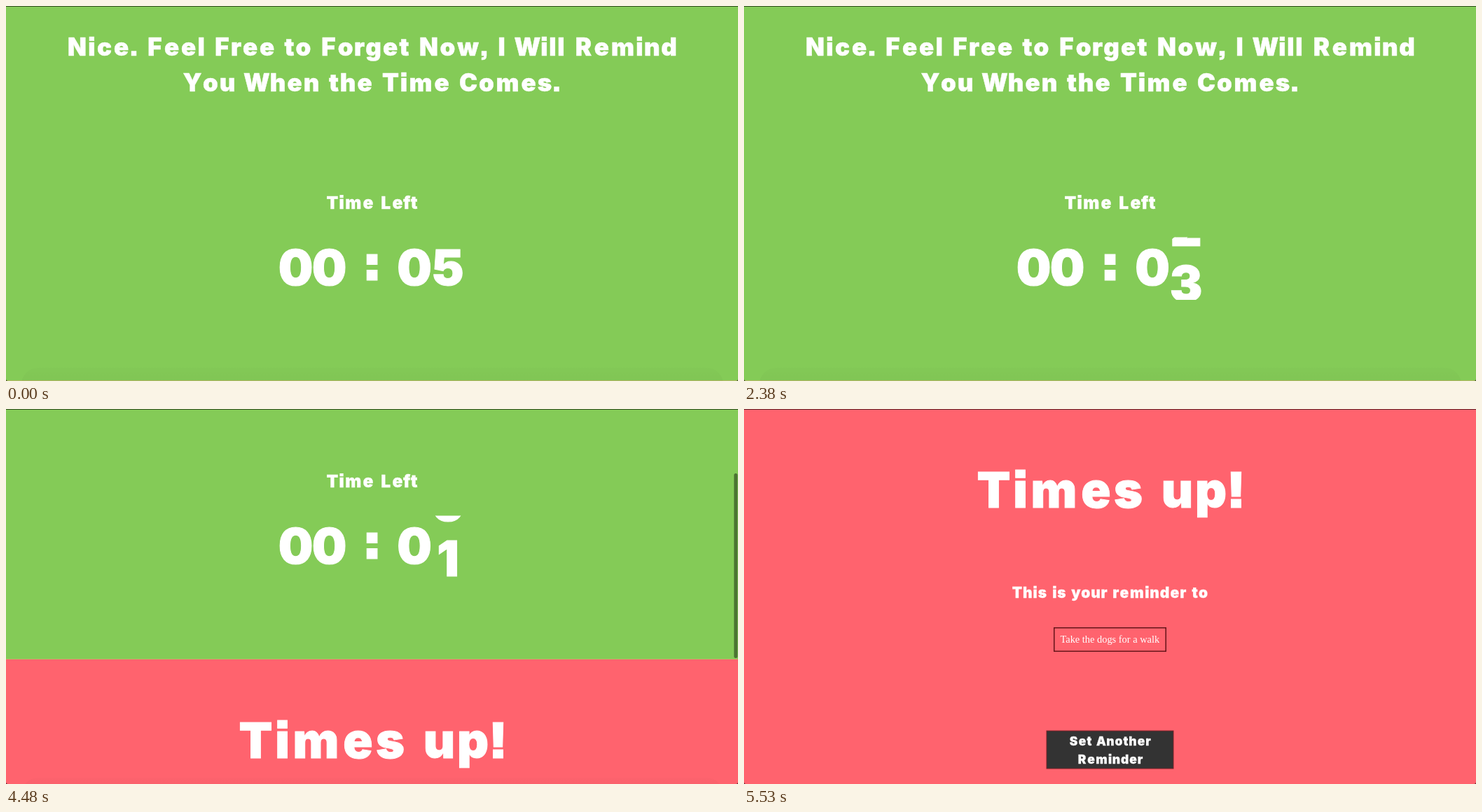
These frames come from a looping animation (1045x536 px, 5.6 s). An HTML page:

```html
<!DOCTYPE html>
<html lang="en">
<head>
<meta charset="utf-8">
<title>Reminder countdown</title>
<style>
  html, body { margin: 0; width: 100%; height: 100%; overflow: hidden; background: #84cb57; }
  svg { display: block; width: 100%; height: 100%; }
  .heavy {
    font-family: "Arial Black", Inter, "Liberation Sans", sans-serif;
    font-weight: 900;
    font-kerning: none;
    /* the text cut is wider and has square dots */
    font-optical-sizing: none;
    font-variation-settings: "opsz" 14;
    font-feature-settings: "ss07";
    text-anchor: middle;
    fill: #fff;
    stroke: #fff;
    white-space: pre;
  }
  .colon {
    font: bold 62px "Liberation Sans", Arial, sans-serif;
    text-anchor: middle;
    fill: #fff;
    stroke: #fff;
    stroke-width: 7px;
  }
  .note { font: 14.4px "Liberation Serif", Times, serif; text-anchor: middle; fill: #fff; }
</style>
</head>
<body>
<svg viewBox="0 0 1045 536" preserveAspectRatio="none">
  <defs>
    <clipPath id="slot"><rect x="605" y="330.5" width="52" height="89.5"/></clipPath>
    <linearGradient id="shade" x1="0" y1="0" x2="0" y2="1">
      <stop offset="0" stop-opacity=".012"/>
      <stop offset=".5" stop-opacity=".04"/>
    </linearGradient>
  </defs>
  <g id="page">
    <rect width="1045" height="536" fill="#84cb57"/>
    <g id="timer"><text class="colon" x="522.5" y="388.5">:</text></g>
    <g clip-path="url(#slot)"><g id="strip"></g></g>
    <g id="alarm" transform="translate(0 536)">
      <rect width="1045" height="536" fill="#ff636e"/>
      <rect y="-1" width="1045" height="1" fill="#b5b866"/>
      <rect x="442.75" y="312.75" width="159.5" height="33.5" fill="none" stroke="#641419" stroke-width="1.5"/>
      <text class="note" x="522.3" y="334">Take the dogs for a walk</text>
      <rect x="432" y="460" width="181" height="54" fill="#333" stroke="#7c2229"/>
    </g>
  </g>
  <rect id="dock" x="22" width="1002" height="60" rx="24" fill="url(#shade)"/>
  <rect id="bar" x="1039.3" width="5" height="264" rx="2.5" fill="#000" fill-opacity=".43"/>
  <rect width="1045" height="1" fill="#000" fill-opacity=".62"/>
  <path d="M0 533Q0 536 3 536H0ZM1045 533Q1045 536 1042 536H1045Z" fill-opacity=".7"/>
</svg>
<script>
const LOOP = 5600, STEP = 70, PITCH = 79, PAGE = 536;
const TICKS = [50, 1080, 2110, 3160, 4245], TICK_MS = 750;
const SCROLL_AT = 4169, SCROLL_MS = 795, BAR_END = 5035;
const $ = id => document.getElementById(id);

// Letter advances of a wide black face, in thousandths of an em.
const ADVANCE = {};
for (const [chars, width] of [
  [" .,!il", 333], ["If", 389], ["rt", 444], ["svy", 611],
  ["FL", 667], ["ST", 722], ["ACRY", 778], ["N", 833], ["w", 944], ["Wm", 1000]
]) for (const c of chars) ADVANCE[c] = width / 1000;
const advance = c => ADVANCE[c] || 0.667;

function heavy(parent, text, cx, y, size) {
  const el = document.createElementNS("http://www.w3.org/2000/svg", "text");
  const total = [...text].reduce((sum, c) => sum + advance(c), 0);
  let x = cx - total * size / 2;
  const centres = [...text].map(c => {
    const w = advance(c) * size;
    x += w;
    return (x - w / 2).toFixed(2);
  });
  el.setAttribute("class", "heavy");
  el.setAttribute("x", centres.join(" "));
  el.setAttribute("y", y);
  el.setAttribute("font-size", size * 0.97);
  el.setAttribute("stroke-width", size * 0.014);
  el.textContent = text;
  $(parent).append(el);
}

heavy("timer", "Nice. Feel Free to Forget Now, I Will Remind", 522.5, 71, 36);
heavy("timer", "You When the Time Comes.", 522, 122, 36);
heavy("timer", "Time Left", 522.5, 289.5, 25.2);
heavy("timer", "00", 437.5, 399, 72);
heavy("timer", "0", 583, 399, 72);
for (let d = 0; d <= 5; d++) heavy("strip", String(d), 631, 399 + d * PITCH, 72);

heavy("alarm", "Times up!", 522.5, 141, 72);
heavy("alarm", "This is your reminder to", 522.5, 269.5, 21.6);
heavy("alarm", "Set Another", 522.5, 480.5, 18);
heavy("alarm", "Reminder", 522.5, 506.5, 18);

function ease(t, from, span) {
  const p = Math.min(1, Math.max(0, (t - from) / span));
  return (1 - Math.cos(Math.PI * p)) / 2;
}

function draw(t) {
  const left = TICKS.reduce((n, at) => n - ease(t, at, TICK_MS), 5);
  const progress = ease(t, SCROLL_AT, SCROLL_MS);
  const scroll = Math.round(progress * PAGE);
  $("strip").setAttribute("transform", `translate(0 ${-left * PITCH})`);
  $("page").setAttribute("transform", `translate(0 ${-scroll})`);
  $("bar").setAttribute("y", 4 + scroll * 0.4945);
  $("bar").setAttribute("visibility", t > SCROLL_AT && t < BAR_END ? "visible" : "hidden");
  $("dock").setAttribute("y", progress > 0 ? 527 : 517);
  $("dock").setAttribute("visibility", t < BAR_END ? "visible" : "hidden");
}

const start = performance.now();
function tick() {
  const t = (performance.now() - start) % LOOP;
  draw(Math.floor(t / STEP) * STEP);
  requestAnimationFrame(tick);
}
tick();
</script>
</body>
</html>
```
